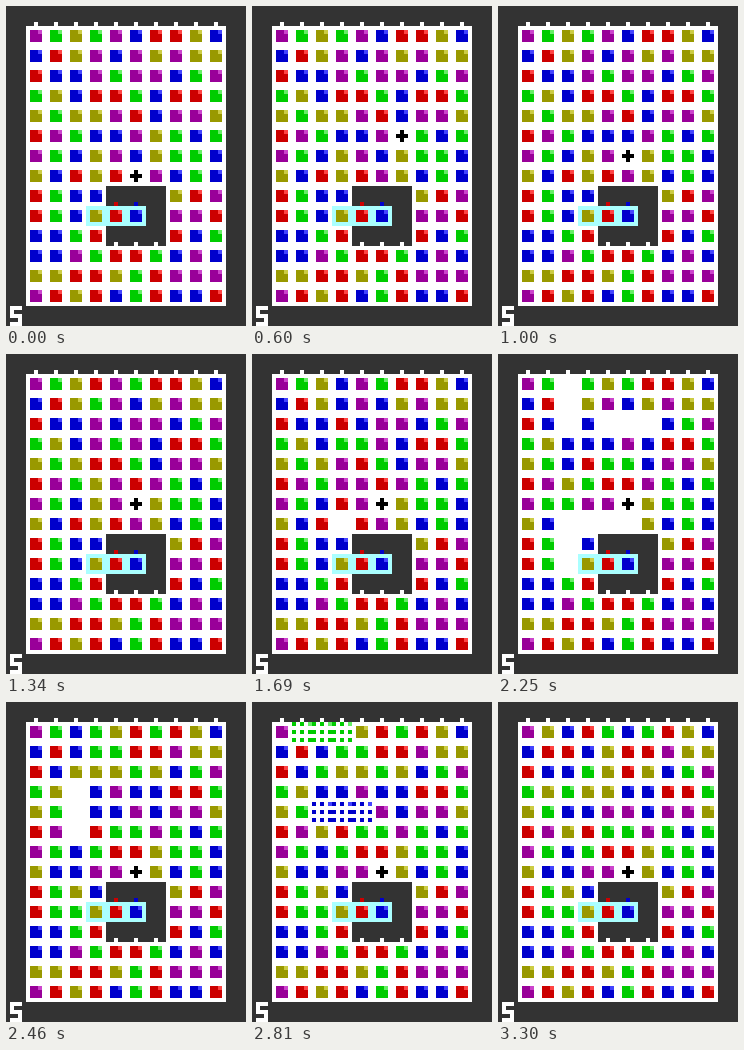
An HTML page with a canvas for the animation above (3.44 s loop, 240x320 px).

```html
<!DOCTYPE html>
<html lang="en">
<head>
<meta charset="utf-8">
<title>Gem board</title>
<style>
html, body { margin: 0; width: 100%; height: 100%; overflow: hidden; background: #333; }
canvas { display: block; width: 240px; height: 320px; image-rendering: pixelated; }
</style>
</head>
<body>
<canvas id="stage" width="240" height="320"></canvas>
<script>
const LOOP = 3440, STEP = 70;
const ctx = document.getElementById('stage').getContext('2d');
ctx.scale(4, 4);   // everything sits on a 60 x 80 grid of big pixels

const COLORS = {   // body, highlight
  R: ['#cc0000', '#ff4444'],
  G: ['#00cc00', '#66ee66'],
  B: ['#0000cc', '#4444ff'],
  Y: ['#999900', '#cccc44'],
  P: ['#990099', '#cc44cc']
};

// One string per column, top to bottom; '.' is a hole, '+' the cursor.
const board = [
  'PBRGYRPYRRBBYP',
  'GRBYGPGBGGBBYR',
  'YYBBYGBRBBGPRY',
  'GPPRYBYYBYRGRR',
  'PBGRPBPR...RYB',
  'BPPGRPB+...RGG',
  'RYPBBYYP...GRR',
  'RPBRPGGBYPRBPB',
  'YYGRPBGGRPBPPB',
  'BYPGYGBBPRGBPR'
].map(s => [...s]);

// Gems that drop in, per column.
const queue = ['', 'Y', 'YYBBGBGRB', 'RBBYGGGBR', 'PYGYYG', 'GRRB', 'G'].map(s => [...s]);

// Cursor steps: x, y
const moves = [[1, 0], [0, -1], [0, -1], [-1, 0], [0, 1]];

// Cleared runs: column, row, width, height
const clears = [
  [1200, [3, 5, 3, 1]],
  [1480, [3, 5, 1, 3]],
  [1900, [2, 7, 3, 1]],
  [2180, [2, 0, 1, 3], [2, 7, 1, 3], [3, 7, 3, 1], [4, 2, 3, 1]],
  [2810, [1, 0, 3, 1], [2, 4, 3, 1]],
  [3160, [3, 2, 3, 1]]
];

const timeline = [];
const save = t => timeline.push({ t, cells: board.map(col => col.join('')) });

function eachCell(runs, fn) {
  for (const [c, r, w, h] of runs)
    for (let x = c; x < c + w; x++)
      for (let y = r; y < r + h; y++) board[x][y] = fn(board[x][y]);
}

// Each column closes its lowest gap by one row.
function fall() {
  let moved = false;
  board.forEach((col, c) => {
    const gap = col.lastIndexOf(' ');
    if (gap < 0) return;
    col.splice(gap, 1);
    col.unshift(queue[c].shift());
    moved = true;
  });
  return moved;
}

function buildTimeline() {
  let x = 5, y = 7;
  save(0);
  moves.forEach(([dx, dy], i) => {
    board[x][y] = board[x + dx][y + dy];
    x += dx;
    y += dy;
    board[x][y] = '+';
    save(200 * (i + 1));
  });
  for (const [start, ...runs] of clears) {
    let t = start;
    eachCell(runs, g => g.toLowerCase());   // lower case: bursting
    save(t);
    eachCell(runs, () => ' ');
    save(t += STEP);
    while (fall()) save(t += STEP);
  }
}

function rect(color, x, y, w, h) {
  ctx.fillStyle = color;
  ctx.fillRect(x, y, w, h);
}

function tile(color, tab, x, y) {
  rect(color, x, y, 5, 5);
  rect(tab, x + 2, y - 1, 1, 1);
}

function gem(kind, x, y) {
  const [body, light] = COLORS[kind];
  rect(body, x + 1, y + 1, 3, 3);
  rect(light, x + 3, y + 1, 1, 1);
}

function burst(kind, x, y) {
  const [body, light] = COLORS[kind];
  for (let i = 0; i < 9; i++)
    rect(i === 2 ? light : body, x + i % 3 * 2, y + (i / 3 | 0) * 2, 1, 1);
}

function cursor(x, y) {
  rect('#000', x + 1, y + 2, 3, 1);
  rect('#000', x + 2, y + 1, 1, 3);
}

function piece() {
  [...'YRB'].forEach((kind, i) => {
    const x = 20 + i * 5;
    tile('#aaffff', i ? COLORS[kind][0] : '#fff', x, 50);
    gem(kind, x, 50);
  });
}

function digit() {
  [7, 4, 7, 1, 7].forEach((bits, y) => {
    for (let x = 0; x < 3; x++)
      if (bits & 4 >> x) rect('#fff', 1 + x, 75 + y, 1, 1);
  });
}

function draw(cells) {
  rect('#333', 0, 0, 60, 80);
  const each = fn => cells.forEach((col, c) =>
    [...col].forEach((g, r) => g !== '.' && fn(g, 5 + c * 5, 5 + r * 5)));
  each((g, x, y) => tile('#fff', '#fff', x, y));
  each((g, x, y) => {
    if (g === '+') cursor(x, y);
    else if (COLORS[g]) gem(g, x, y);
    else if (g !== ' ') burst(g.toUpperCase(), x, y);
  });
  piece();
  digit();
}

let shown = null;
function render() {
  const t = performance.now() % LOOP;
  let state = timeline[0];
  for (const s of timeline) if (s.t <= t) state = s;
  if (state !== shown) draw((shown = state).cells);
  requestAnimationFrame(render);
}

buildTimeline();
render();
</script>
</body>
</html>
```
